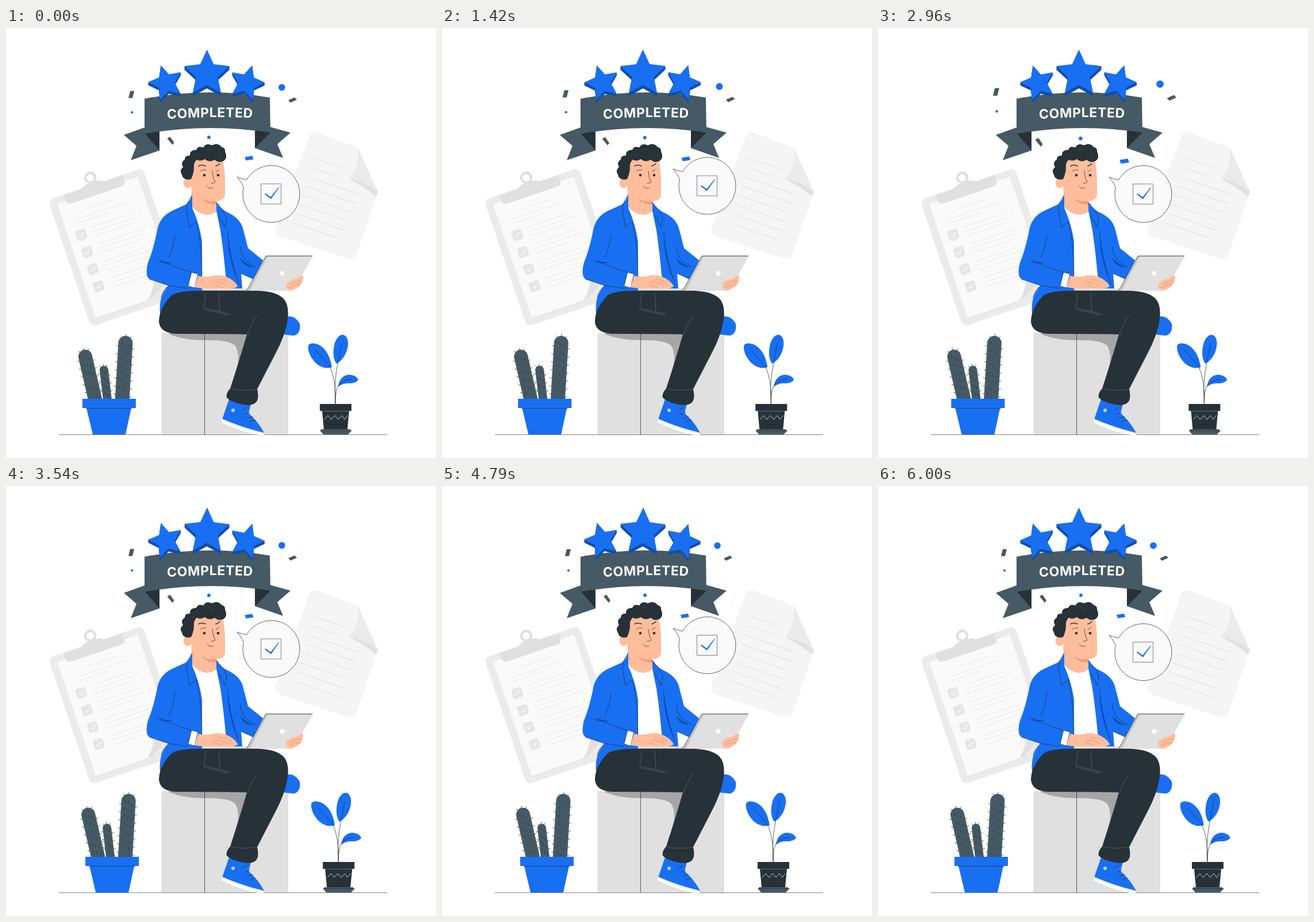
Recreate the animation shown at these times as an HTML page. Size 748x748 px, loop 6.04 s.

```html
<!DOCTYPE html>
<html lang="en">
<head>
<meta charset="utf-8">
<title>Completed</title>
<style>
  html, body { margin: 0; width: 100%; height: 100%; overflow: hidden; background: #fff; }
  svg { display: block; width: 100vw; height: 100vh; }
  .blue { fill: #186ff2; }
  .deep { fill: #114eaa; }
  .dark { fill: #263238; }
  .slate { fill: #455a64; }
  .skin { fill: #ffbd9b; }
  .gray { fill: #e0e0e0; }
  .ink { fill: none; stroke: #263238; stroke-width: .75; stroke-linecap: round; stroke-linejoin: round; }
  .brow { fill: none; stroke: #263238; stroke-width: 1.4; stroke-linecap: round; }
  .rule { fill: none; stroke: #e0e0e0; stroke-width: .7; stroke-linecap: round; }
  .title { font: 700 23px Inter, "Open Sans", sans-serif; letter-spacing: .55px; fill: #fff; }
</style>
</head>
<body>
<svg viewBox="0 0 748 748">
  <!-- clipboard -->
  <g transform="translate(73 299) rotate(-18.7)">
    <rect width="174" height="233" rx="10" fill="#ebebeb"/>
    <path d="M13 12H161V185L141 193Q132 212 108 221H13Z" fill="#fafafa"/>
    <path d="M12 222H108Q124 212 150 180" class="rule"/>
    <path d="M108 221Q127 204 133 184Q146 184 161 176V186Q138 214 108 221Z" class="gray"/>
    <path d="M28 1H62Q67 -5 82 -5T102 1H137V9Q137 19 127 19H39Q28 19 28 9Z" class="gray"/>
    <circle cx="82" cy="-13" r="8.5" fill="none" stroke="#e0e0e0" stroke-width="4.5"/>
    <g id="tasks"></g>
  </g>

  <!-- sheet -->
  <path d="M528 187Q532 180 542 182L612 208L647 285L610 394Q606 404 596 402L477 363Q466 358 469 348Z" fill="#f5f5f5"/>
  <path d="M612 208Q616 240 597 262Q625 270 647 285Z" fill="#ebebeb"/>
  <path d="M597 262Q625 268 647 285L644 293Q622 276 597 262Z" class="gray"/>
  <g id="lines"></g>

  <!-- ground and seat -->
  <path d="M92 707.5H663" stroke="#263238" stroke-width=".6"/>
  <path d="M270.5 531H491V707H270.5Z" class="gray"/>
  <path d="M281 531Q305 543 345 543Q386 542 398 552Q408 564 401 598L393 626L430 531Z" fill="#a6a6a6"/>
  <path d="M345.5 532V707" class="ink"/>

  <!-- ribbon -->
  <path d="M205 186L241 173L267 180V213L217 230L227 205Z" class="slate"/>
  <path d="M495 182L459 172L433 178V209L482 226L472 202Z" class="slate"/>
  <path d="M241 183L267 176V213ZM460 182L433 176V209Z" class="dark"/>
  <path d="M241 123Q350 102 459 121L460 182Q350 165 241 184Z" class="slate"/>
  <path id="arc" d="M255 160.5Q355 151 455 158" fill="none"/>
  <text class="title" text-anchor="middle"><textPath href="#arc" startOffset="50%">COMPLETED</textPath></text>
  <g id="stars"></g>

  <g id="confetti">
    <path d="M217 110H224L221 122H214ZM490 126L501 121L505 125L494 130ZM281 192L286 189L293 199L290 203Z" class="slate"/>
    <g class="blue">
      <path d="M415 224L428 222L430 228L417 230Z"/>
      <circle cx="479" cy="103.7" r="5.8"/>
      <circle cx="220" cy="147" r="2.1"/>
      <circle cx="353" cy="190" r="2.9"/>
    </g>
  </g>

  <!-- speech bubble -->
  <g id="bubble">
    <path d="M418.5 264.5A49.5 49.5 0 1 1 413.4 277.3Q409 267 402 259.5Q410 263 418.5 264.5Z" fill="#fafafa" stroke="#263238" stroke-width=".75"/>
    <path d="M443.5 271.5H478.5V306.5H443.5Z" fill="#fafafa" stroke="#263238" stroke-width=".6"/>
    <path d="M450 289.5L451.5 288L460.5 294.500L474 277.5L475 278L461 298Z" class="blue"/>
  </g>

  <!-- far foot -->
  <path d="M486 502Q504 500 512 514Q515 533 502 536L482 535Z" fill="#e9eef5"/>
  <path d="M486 502Q503 499 511 515Q513 531 501 535L480 533Z" class="blue"/>

  <!-- shirt, neck and face -->
  <path d="M324 308Q345 332 368 312L384 350L390 454H340L334 340Z" fill="#fff"/>
  <path d="M322 255L323 311Q346 334 366 319V298Z" class="skin"/>
  <path d="M340 296Q351 304 366 301V307Q348 307 340 296Z" fill="#f29a78"/>
  <path d="M322 236Q334 222 354 226L377 229Q382 250 381 291Q380 299 369 301Q346 302 336 290L322 274Z" class="skin"/>
  <ellipse cx="316" cy="269.5" rx="7.5" ry="9" class="skin"/>
  <path d="M322 263Q308 266 306 255Q301 248 308 242Q303 234 311 229Q311 221 320 222Q319 212 331 212Q334 204 343 208Q348 199 358 204Q369 199 375 207Q382 209 381 215Q386 225 379 231Q370 236 363 229Q354 235 346 228Q338 233 332 229Q326 234 327 243Q327 252 322 263Z" class="dark"/>
  <path d="M327 223Q331 217 338 221M346 214Q352 208 360 214M365 221Q370 226 376 219" fill="none" stroke="#435058" stroke-width=".6"/>
  <path d="M335 240Q341 237 347 240M365 240Q369 239 372 236" class="brow"/>
  <path d="M338 249Q342 246 348 247M365 250L371 246M359 249Q360 262 364 268Q361 271 357 270M350 275Q354 281 360 278" class="ink"/>
  <circle cx="345" cy="256" r="2.3" class="dark"/>
  <circle cx="369" cy="256" r="2.3" class="dark"/>

  <!-- jacket -->
  <path d="M324 289Q321 300 313 307L291 317Q270 326 264 347Q257 384 247 408Q241 432 250 437L283 448Q265 466 268 497L302 468L341 457V372Q337 342 324 313Z" class="blue"/>
  <path d="M366 302Q374 316 386 321Q407 331 412 348L421 383L447 404L431 437L409 427L411 453H384Q380 400 373 352L366 318Z" class="blue"/>
  <path d="M258 402Q271 409 291 407Q277 414 258 402ZM407 400Q417 410 431 416Q413 416 407 400ZM385 347Q390 405 409 452Q384 405 385 347Z" class="deep"/>
  <path d="M323 292Q314 304 314 316L319 347L331 337M367 306Q382 320 384 332L381 347L370 326M294 360Q291 385 283 399M250 437L283 448L317 453M283 448Q273 456 270 468M269 404Q290 415 322 425M408 380Q408 404 434 415M409 427L431 437M331 337Q341 370 341 453" class="ink"/>
  <path d="M323 425L334 428L328 452L317 449Z" class="ink" style="fill:#fff"/>

  <!-- trousers and shoe -->
  <path d="M390 640L426 654L422 670Q438 684 449 704L447 708Q410 699 375 684Z" class="blue"/>
  <path d="M376 680Q410 695 448 704L449 708Q425 710 374 686Z" fill="#fff" stroke="#c9d3de" stroke-width=".5"/>
  <circle cx="395" cy="665" r="3" fill="#b9d2fb"/>
  <path d="M411 665L419 660M415 672L424 669M419 679L429 676M424 685L434 682" class="ink"/>
  <path d="M288 465Q301 456 345 457H430Q468 456 483 471Q493 482 490 507Q486 534 469 566L437 628Q441 646 434 652Q425 659 408 654Q390 650 384 643Q382 636 390 627Q406 578 419 533Q405 532 300 532Q268 532 266 511Q266 488 288 465Z" class="dark"/>
  <path d="M348 460L344 487L391 498M370 461L372 493M345 490L386 499M438 500Q430 506 420 534M390 627Q411 633 437 628" fill="none" stroke="#76828a" stroke-width=".5"/>

  <!-- laptop and hands -->
  <path d="M341 453H500L497 457H341Z" class="gray"/>
  <path d="M341 457H421" class="ink" style="stroke-width:.5"/>
  <path d="M452 396.5H533L500 457H419Z" fill="#c4c4c4"/>
  <path d="M455 398H533L500 457H424Z" class="gray"/>
  <path d="M419 456L452 396.5H533" class="ink"/>
  <circle cx="480.5" cy="427" r="4" fill="#fff"/>
  <path d="M334 431Q346 434 356 432Q368 428 382 432Q398 439 403 449Q400 453 392 453H343L328 451Z" class="skin"/>
  <path d="M369 438Q383 436 391 444M362 442Q378 441 386 449M360 446L376 452" fill="none" stroke="#e98c69" stroke-width=".7"/>
  <path d="M506 436Q513 428 517 432Q518 436 515 439Q517 443 513 446Q510 452 500 455Q491 458 489 453Q486 451 488 445Q492 438 506 436Z" class="skin"/>
  <path d="M515 439Q504 440 494 446M513 446Q501 447 492 452" fill="none" stroke="#e98c69" stroke-width=".7"/>

  <!-- cactus -->
  <g class="pot">
    <g id="cactus"></g>
    <path d="M133 645H226V661H218L208 707H151L140 661H133Z" class="blue"/>
    <path d="M140 661.5H219" class="ink"/>
  </g>

  <!-- leafy plant -->
  <g class="pot">
    <path d="M526 552Q530 546 542 550Q562 559 567 590Q553 595 539 583Q524 567 526 552Z" class="blue"/>
    <path d="M575 584Q566 572 572 548Q577 534 586 533.5Q596 536 595 552Q592 574 575 584Z" class="blue"/>
    <path d="M578 624Q580 605 597 603Q610 604 613 612Q608 619 595 618Q585 618 578 624Z" class="blue"/>
    <path d="M573 653Q575 614 563 588L539 561M573 653Q570 616 578 580L584 549M573 653Q573 628 579 621Q586 612 602 611" class="ink"/>
    <path d="M546 654H601V666H597L594 698H553L550 666H546Z" class="dark"/>
    <path d="M551 666.5H596" stroke="#fff" stroke-width=".3"/>
    <path d="M554 681l6 -7l6 7l6 -7l6 7l6 -7l5 7l5 -7" fill="none" stroke="#fff" stroke-width=".7"/>
    <path d="M548 698H599V700H602L595 707H552L546 700H548Z" class="slate"/>
    <path d="M547 700.5H601" class="ink"/>
  </g>
</svg>
<script>
const $ = id => document.getElementById(id);
const range = n => [...Array(n).keys()];

$('tasks').innerHTML =
  '<path class="rule" d="M57 36H113M37 48H127M37 55H90"/>' +
  range(4).map(i => `<g transform="translate(35.4 ${76.4 + i * 31.4})">
    <rect x="-9" y="-9" width="18" height="18" rx="4" fill="#e6e6e6"/>
    <path d="M-4 0L-1 3.5L5 -3.5" fill="none" stroke="#fafafa" stroke-width="1.3"/>
    <path class="rule" d="M22 -7H${i % 2 ? 104 : 98}M22 1H108M22 9H${i % 2 ? 84 : 92}"/></g>`).join('');

$('lines').innerHTML = [54, 48, 92, 92, 90, 88, 92, 84].map((len, i) => {
  const x = 537 - i * 5.2, y = 227 + i * 16;
  return `<path class="rule" style="stroke-width:1.1" d="M${x} ${y}l${len * .944} ${len * .33}"/>`;
}).join('');

function star(cx, cy, r, tilt, depth) {
  const points = range(10).map(i => {
    const a = (tilt - 90 + i * 36) * Math.PI / 180, k = i % 2 ? r * .48 : r;
    return `${(cx + k * Math.cos(a)).toFixed(1)},${(cy + k * Math.sin(a)).toFixed(1)}`;
  }).join(' ');
  return range(depth + 1).reverse().map(d =>
    `<polygon points="${points}" class="${d ? 'deep' : 'blue'}" transform="translate(0 ${d})"/>`).join('');
}
$('stars').innerHTML = star(278.5, 95, 31.5, -17, 5) + star(419, 95, 31.5, 17, 5) + star(349.5, 79, 41.5, 0, 6);

// A rounded stem with rows of ribs and short spines along its sides.
function stem(x, y, foot, width) {
  const len = 650 - y, half = width / 2;
  const lean = Math.atan2(x - foot, len) * 180 / Math.PI;
  let spines = `M0 ${-half}v-3M${-half * .6} ${-half * .8}l-2 -2M${half * .6} ${-half * .8}l2 -2`;
  for (let d = 4; d < len - 10; d += 14) {
    spines += `M${-half} ${d + 2}l-3 -1M${half} ${d + 6}l3 -1`;
  }
  const ribs = [-.45, 0, .45].map((k, i) => `M${k * half} ${i * 3 - 2}V${len}`).join('');
  return `<g transform="translate(${x} ${y}) rotate(${lean})">
    <path d="M0 0V${len}" stroke="#455a64" stroke-width="${width}" stroke-linecap="round"/>
    <path d="${ribs}" class="ink" stroke-dasharray="4 9" style="stroke-width:.6"/>
    <path d="${spines}" class="ink"/></g>`;
}
$('cactus').innerHTML = stem(138, 571.5, 156, 24) + stem(170.5, 595, 177, 15) + stem(208, 548, 202, 25);

// Each track: cycle in ms and [part of cycle, value] stops.
const tracks = {
  float: [3000, [[0, 0], [.5, -15], [1, 0]]],
  sway: [1500, [[0, 0], [.25, 1], [.75, -1], [1, 0]]],
  beat: [6000, [[0, 1], [.1, 1.1], [.3, 1], [.4, 1], [.5, 1.1], [.6, 1], [1, 1]]],
  shake: [6000, [[0, 0], [.1, -1.5], [.2, 3], [.3, -6], [.4, 6], [.5, -6], [.6, 6], [.7, -6], [.8, 3], [.9, -1.5], [1, 0]]]
};

function valueAt(name, time) {
  const [cycle, stops] = tracks[name];
  const p = time % cycle / cycle;
  const i = stops.findIndex(s => s[0] > p);
  const [p0, v0] = stops[i - 1], [p1, v1] = stops[i];
  return v0 + (v1 - v0) * (p - p0) / (p1 - p0);
}

const LOOP = 6040, FPS = 24, LAST = 144;
const pots = document.querySelectorAll('.pot');

function draw() {
  const step = Math.min(LAST, Math.floor(performance.now() % LOOP * FPS / 1000 + .1));
  const time = 40 + step / LAST * 5960;
  const move = (el, value) => el.setAttribute('transform', value);
  move($('bubble'), `translate(0 ${valueAt('float', time)})`);
  move($('stars'), `rotate(${valueAt('sway', time)} 349 82)`);
  move($('confetti'), `translate(359.5 167) scale(${valueAt('beat', time)}) translate(-359.5 -167)`);
  pots.forEach(pot => move(pot, `translate(${valueAt('shake', time)} 0)`));
  requestAnimationFrame(draw);
}
draw();
</script>
</body>
</html>
```
